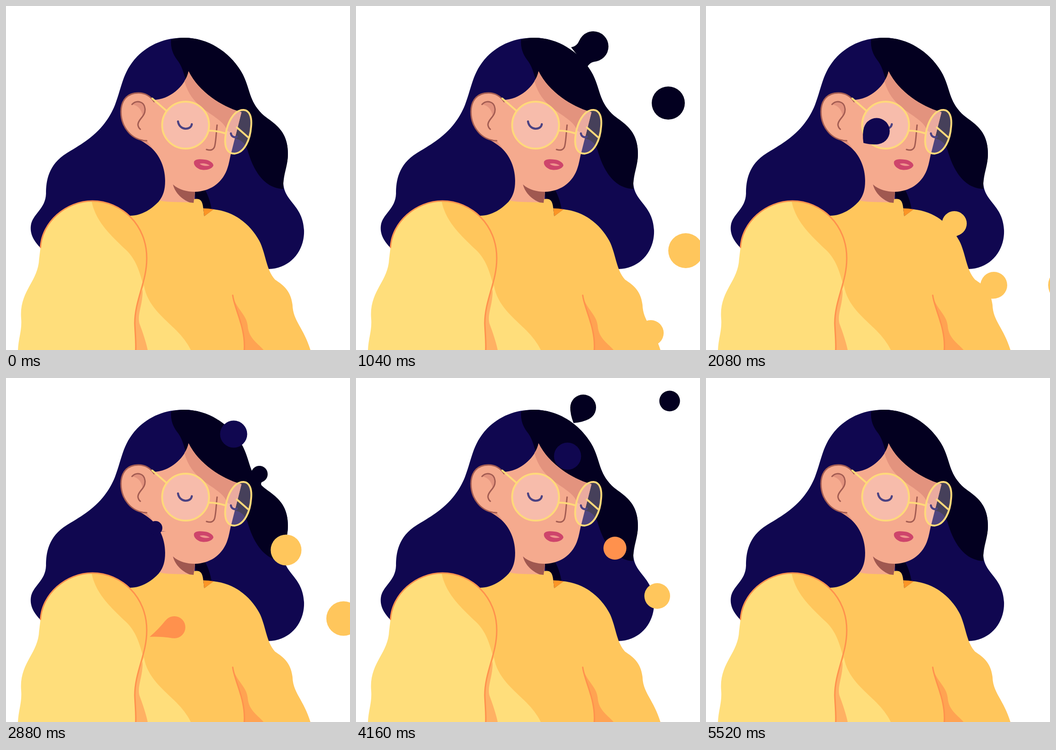
Write an HTML page that moves like this. It is 748x748 px and loops after 5.76 s.

```html
<!DOCTYPE html>
<html lang="en">
<head>
<meta charset="utf-8">
<title>Portrait with drifting drops</title>
<style>
  html, body { margin: 0; width: 100%; height: 100%; overflow: hidden; background: #fff; }
  svg { display: block; width: 100vw; height: 100vh; }
  .navy { fill: #100750; }
  .black { fill: #030020; }
  .skin { fill: #f5aa8e; }
  .shade { fill: #e3937e; }
  .yellow { fill: #ffc65c; }
  .light { fill: #ffde7b; }
  .orange { fill: #ff914d; }
  .lens { fill: rgba(250, 235, 247, .27); }
  .line { fill: none; stroke-linecap: round; stroke-width: 3; }
  .brown { stroke: #a35c52; }
  .seam { stroke: #ff914d; }
  .gold { stroke: #ffd97a; stroke-width: 4; }
  .eye { stroke: #4b4282; stroke-width: 4.5; }
</style>
</head>
<body>
<svg viewBox="0 0 748 748">
  <!-- hair -->
  <path class="navy" d="M75 526C60 511 52 495 54 478C57 452 86 442 87 408C87 380 92 345 132 320C166 299 213 275 237 215C253 172 254 143 285 110C312 83 346 69 387 69C443 69 491 104 515 149C531 181 528 205 556 234C576 253 613 265 613 321C613 346 603 361 603 385C605 426 645 432 648 487C650 531 619 571 571 572L400 620L100 600Z"/>
  <path class="black" d="M359 73C357 95 366 110 375 121C385 136 386 148 391 160L480 285L497 288C511 290 522 300 526 316C536 350 557 396 603 398Q602 384 606 365C610 348 613 337 613 321C613 265 576 253 556 234C528 205 531 181 515 149C491 104 443 69 387 69Q372 69 359 73Z"/>
  <path class="black" d="M408 404L433 400C440 413 445 428 447 443L425 446Z"/>
  <!-- face -->
  <path class="skin" d="M397 142C389 177 352 206 317 204L275 240L287 289Q297 294 308 302C331 318 346 347 346 380C346 400 342 412 333 424L345 440L409 432L411 404C442 403 468 387 480 357C486 341 486 332 490 318L512 231C470 219 420 188 397 142Z"/>
  <path class="shade" d="M397 142C420 188 470 219 512 231L499 283L480 270C470 236 405 230 388 163Q395 153 397 142ZM290 290L306 293L320 311Q308 300 290 290Z"/>
  <path fill="#a05850" d="M363 388C376 400 394 404 411 404L408 430C389 425 369 411 363 388Z"/>
  <path class="skin" d="M322 208C314 196 302 189 288 189C262 189 250 207 250 230C250 262 272 292 306 293L325 250Z"/>
  <path class="shade" d="M274 214C284 204 300 207 302 222Q303 231 297 239Q293 217 274 214Z"/>
  <path class="line brown" d="M322 208C314 196 302 189 288 189C262 189 250 207 250 230C250 262 272 292 306 293M274 214C284 204 300 207 302 222C305 240 286 246 287 259Q288 265 292 268M459 259C457 275 457 290 454 304C452 313 445 315 436 312"/>
  <path fill="#ce456b" d="M409 338C413 332 424 333 432 334C442 335 451 341 451 347C446 357 430 358 421 355C412 351 407 344 409 338Z"/>
  <path fill="#f0958e" d="M421 343C428 341 438 343 443 347C434 349 425 347 421 343Z"/>
  <!-- glasses -->
  <path class="line gold" d="M318 201L349 228"/>
  <g class="lens">
    <circle cx="390.500" cy="259" r="51"/>
    <path id="rim" d="M517 226C530 227 535 242 533 262C531 290 519 319 497 321C479 321 475 303 477 285C480 255 495 225 517 226Z"/>
  </g>
  <path class="line eye" d="M374 251C377 271 402 271 404 257M489 277C490 284 497 287 502 284"/>
  <g class="line gold">
    <circle cx="390.500" cy="259" r="51"/>
    <path d="M517 226C530 227 535 242 533 262C531 290 519 319 497 321C479 321 475 303 477 285C480 255 495 225 517 226ZM441 271Q458 271 477 277M502 264L526 285"/>
  </g>
  <!-- sweater -->
  <path class="yellow" d="M334 423C355 428 385 425 408 428L409 420C422 418 427 422 429 440L431 457L451 442C501 447 536 480 553 515C566 545 566 573 585 595C601 606 619 617 623 650C624 685 647 699 662 748L100 748L270 456C296 456 319 440 334 423Z"/>
  <path fill="#fb9526" d="M429 440Q440 440 452 442L431 457Z"/>
  <path class="light" d="M300 607C306 651 345 680 370 705Q391 726 402 748L282 748L270 680Z"/>
  <path fill="#ffb163" d="M297 616C298 650 285 668 290 690C299 714 305 733 308 748L276 748L276 660Z"/>
  <path fill="#ffa352" d="M493 629C500 660 525 670 526 700C530 725 550 735 560 748L518 748C522 700 497 660 493 629Z"/>
  <path class="line seam" d="M493 629C497 660 522 700 518 750"/>
  <g id="under"></g>
  <!-- sleeve -->
  <path class="light" d="M75 525C78 470 130 424 188 424C250 424 307 475 306 550C306 600 280 640 280 690C281 715 283 730 282 748L26 748C27 722 35 706 33 680C28 620 70 600 72 550Z"/>
  <path class="yellow" d="M186 424C195 470 230 500 255 525C285 550 290 580 299 607C304 587 306 570 306 550C307 475 250 424 186 424Z"/>
  <path class="line seam" d="M75 525C78 470 130 424 188 424C250 424 307 475 306 550C306 600 280 640 280 690C281 715 283 730 282 750"/>
  <g id="over"></g>
</svg>
<script>
const LOOP = 5760, STEP = 80, RETRACT = 200;
const drops = [];
const clamp = v => Math.max(0, Math.min(1, v));
const mix = (a, b, k) => a + (b - a) * k;

function make(tag, parent) {
  return parent.appendChild(document.createElementNS("http://www.w3.org/2000/svg", tag));
}

// Each key is [time, x, y, radius]; the first key is the anchor on the edge, cut is when the neck breaks.
function drop(color, cut, ...keys) {
  const group = make("g", document.getElementById(color === "orange" ? "under" : "over"));
  group.setAttribute("class", color);
  drops.push({ group, cut, keys, ball: make("circle", group), neck: make("path", group) });
}

function pose(keys, t) {
  let i = 1;
  while (i < keys.length - 1 && keys[i][0] < t) i++;
  const a = keys[i - 1], b = keys[i], k = (t - a[0]) / (b[0] - a[0]);
  return [mix(a[1], b[1], k), mix(a[2], b[2], k), mix(a[3], b[3], clamp(k))];
}

function neckPath(x, y, r, ax, ay, p, shrink, full) {
  const gap = Math.hypot(x - ax, y - ay) || 1;
  const ux = (x - ax) / gap, uy = (y - ay) / gap;
  const reach = mix(gap, r * 0.9, shrink);
  const width = 1.3 * full * (1 - p * p);
  const pull = Math.max(0, reach - r / 2) * 0.6;
  const point = (back, side) => `${x - ux * back - uy * side} ${y - uy * back + ux * side}`;
  const back = r * 0.5, side = r * 0.87;
  const bendBack = back + pull * 0.87, bendSide = side - pull * 0.5;
  return `M${point(reach, width)}Q${point(bendBack, bendSide)} ${point(back, side)}` +
    `L${point(back, -side)}Q${point(bendBack, -bendSide)} ${point(reach, -width)}Z`;
}

function draw(t) {
  for (const { group, cut, keys, ball, neck } of drops) {
    const [start, ax, ay] = keys[0];
    group.style.display = t > start ? "" : "none";
    if (t <= start) continue;
    const [x, y, r] = pose(keys, t);
    ball.setAttribute("cx", x);
    ball.setAttribute("cy", y);
    ball.setAttribute("r", r);
    const p = clamp((t - start) / (cut - start)), shrink = clamp((t - cut) / RETRACT);
    neck.setAttribute("d", shrink < 1 ? neckPath(x, y, r, ax, ay, p, shrink, Math.min(r * 1.3, keys.at(-1)[3])) : "");
  }
}

drop("black", 680, [40, 590, 285, 0], [640, 630, 257, 35], [1040, 679, 211, 36]);
drop("yellow", 680, [40, 605, 630, 0], [640, 658, 572, 36], [1040, 717, 532, 38]);
drop("black", 1240, [700, 485, 112, 0], [1040, 516, 88, 33], [1280, 546, 53, 36]);
drop("yellow", 1400, [680, 622, 725, 0], [1040, 641, 711, 28], [2080, 781, 607, 37]);
drop("navy", 1940, [1440, 320, 318, 0], [2080, 371, 272, 28.5], [2880, 495, 122, 29.5], [3440, 579, 21, 29.5]);
drop("yellow", 2100, [1640, 598, 630, 0], [2080, 626, 607, 29], [2880, 734, 523, 37.5]);
drop("yellow", 2500, [1680, 515, 500, 0], [2080, 540, 473, 27], [2880, 609, 374, 33.5], [3440, 691, 251, 33.5]);
drop("orange", 2840, [2400, 304, 566, 0], [2880, 366, 542, 24], [3440, 445, 481, 25], [4160, 563, 370, 25]);
drop("black", 3240, [2480, 540, 222, 0], [2880, 551, 209, 18], [3440, 583, 179, 22], [4160, 682, 50, 22.5]);
drop("navy", 3440, [2640, 325, 333, 0], [2880, 325, 326, 15], [3440, 358, 290, 27.5], [4160, 460, 170, 29.5]);
drop("yellow", 3800, [3080, 574, 573, 0], [3440, 588, 557, 23], [4160, 655, 474, 28], [4480, 703, 416, 28]);
drop("black", 4160, [3680, 473, 98, 0], [4160, 494, 64, 28], [4800, 582, -45, 28.5]);

function tick() {
  const t = performance.now() % LOOP;
  draw(Math.floor(t / STEP) * STEP);
  requestAnimationFrame(tick);
}
tick();
</script>
</body>
</html>
```
